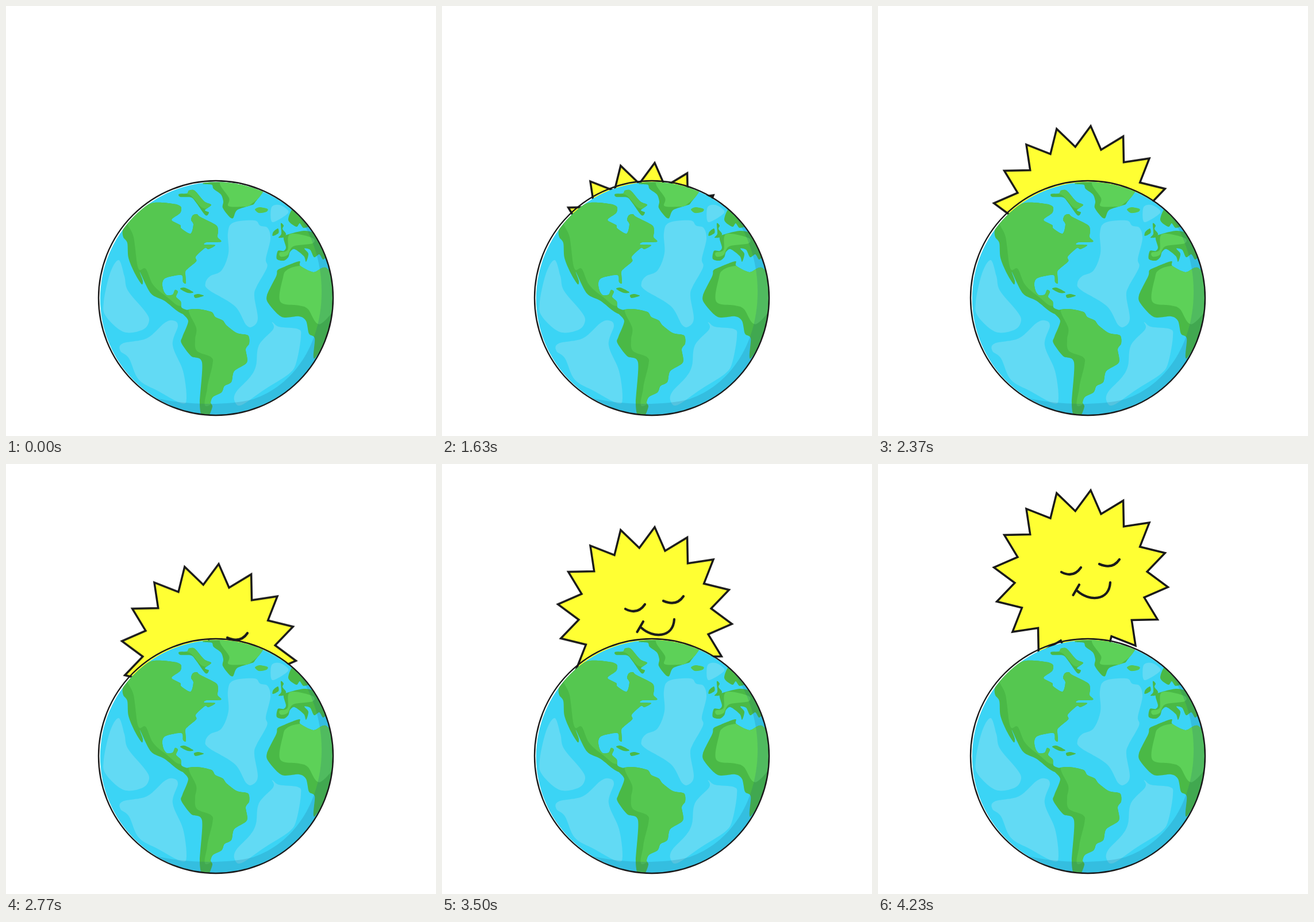
An HTML page that plays this animation: 748x748 px, repeating every 5630 ms.

```html
<!DOCTYPE html>
<html lang="en">
<head>
<meta charset="utf-8">
<title>Sunrise over the Earth</title>
<style>
  html, body { margin: 0; width: 100%; height: 100%; overflow: hidden; background: #fff; }
  svg { display: block; width: 100%; height: 100%; }
  .sun { animation: rise 5630ms infinite; }
  .body { fill: #ffff33; stroke: #1a1a1a; stroke-width: 3.5; stroke-miterlimit: 8; }
  .face { fill: none; stroke: #1a1a1a; stroke-width: 4.2; stroke-linecap: round; }
  @keyframes rise {
    0%, 21.24% { transform: translateY(300px); }
    21.243% { transform: translateY(265px); animation-timing-function: steps(91, end); }
    75.062%, 100% { transform: translateY(0); }
  }
</style>
</head>
<body>
<svg viewBox="0 0 748 748">
  <defs>
    <clipPath id="globe"><circle cx="366.5" cy="509" r="202.7"/></clipPath>
  </defs>
  <g class="sun">
    <path class="body" id="star"/>
    <path class="face" d="M319 188Q340 199 353 180M385 174Q408 184 420 166"/>
    <path class="face" d="M347 221C367 239 402 239 404 206M339.5 228L350 210"/>
  </g>
  <g clip-path="url(#globe)">
    <circle cx="366.5" cy="509" r="204" fill="#3bd4f5"/>
    <g id="map"></g>
    <path fill="#1a5a80" fill-opacity=".18"
      d="M258 681C300 693 380 697 430 684C500 660 548 590 549 500C550 450 535 390 488 338H600V740H240Z"/>
  </g>
  <circle cx="365" cy="508" r="204" fill="none" stroke="#1a1a1a" stroke-width="2.4"/>
</svg>
<script>
const NS = 'http://www.w3.org/2000/svg';
const map = document.getElementById('map');
const WATER = '#62daf4', DARK = '#4ab946', MID = '#55c750', LIGHT = '#5dd158';

// Sixteen rays, tips and notches alternating around the centre.
function star(cx, cy, tip, notch, rays, start) {
  let d = '';
  for (let i = 0; i < rays * 2; i++) {
    const angle = start + i * Math.PI / rays, r = i % 2 ? notch : tip;
    d += `${i ? 'L' : 'M'}${cx + r * Math.cos(angle)} ${cy + r * Math.sin(angle)}`;
  }
  return d + 'Z';
}
document.getElementById('star').setAttribute('d', star(353, 197, 152.3, 115.5, 16, -1.459));

// Closed Catmull-Rom curve; tension below 1 keeps coastlines crisp.
function smooth(text, tension = 1) {
  const pts = text.trim().split(/\s+/).map(p => p.split(',').map(Number));
  const at = i => pts[(i + pts.length) % pts.length];
  const handle = (i, dir) => at(i).map((v, k) =>
    (v + dir * tension * (at(i + 1)[k] - at(i - 1)[k]) / 6).toFixed(1));
  return 'M' + pts[0] + pts.map((_, i) =>
    `C${handle(i, 1)} ${handle(i + 1, -1)} ${at(i + 1)}`).join('') + 'Z';
}

function add(parent, tag, attrs) {
  const el = document.createElementNS(NS, tag);
  for (const name in attrs) el.setAttribute(name, attrs[name]);
  return parent.appendChild(el);
}

function sea(points) {
  add(map, 'path', { d: smooth(points), fill: WATER });
}

let count = 0;
function land(coast, color, inner, innerColor) {
  const d = smooth(coast, 0.85);
  add(map, 'path', { d, fill: color });
  if (!inner) return;
  const id = 'land' + count++;
  add(add(map, 'clipPath', { id }), 'path', { d });
  add(map, 'path', { d: smooth(inner), fill: innerColor, 'clip-path': `url(#${id})` });
}

// Pale currents
sea('196,442 206,470 212,495 241,530 249,547 238,563 205,567 174,540 170,515 181,465');
sea(`290,547 299,556 290,590 308,635 314,682 305,691 265,670 231,650 214,613 199,600 203,587
  245,578 275,552`);
sea(`395,377 432,373 442,382 455,386 460,405 452,440 454,455 436,488 432,505 438,543 430,557
  418,555 398,522 353,494 347,482 355,470 375,460 387,430 386,395`);
sea(`463,550 475,558 508,562 513,575 505,620 492,640 450,667 410,694 398,688 400,672 425,645
  435,625 440,590 465,562`);
sea('462,350 475,346 488,353 490,361 468,375 461,372');

// Greenland, Arctic islands, Iceland
land(`343,308 395,290 450,310 433,342 425,347 402,355 395,369 388,366 377,351 378,340 374,328
  361,318 358,311`, DARK, '372,306 388,334 387,348 412,349 425,346 448,318 400,290', LIGHT);
land(`301,327 315,326 318,321 328,321 345,340 357,346 346,355 353,359 347,364 330,341 322,333
  303,332`, DARK, '309,325 322,330 340,350 352,352 362,346 328,316', MID);
land('433,354 441,350 455,353 453,358 440,360', MID);

// North and Central America
land(`253,343 290,344 304,349 303,360 288,372 303,381 305,387 321,396 326,380 322,372 325,364
  332,362 338,367 365,381 369,391 368,402 374,410 349,411 345,415 364,416 352,423 346,421
  330,436 331,444 316,457 312,463 313,482 308,480 305,468 278,473 272,482 274,495 280,503
  290,502 294,494 299,497 296,506 304,514 306,525 322,532 316,538 300,532 276,513 252,500
  233,463 238,478 236,484 224,465 213,438 211,412 204,402 204,388 222,364`, DARK,
  '212,372 222,402 230,456 243,457 256,485 280,506 305,521 320,480 390,410 330,330 240,335', MID);
land('303,492 311,490 326,498 316,499', DARK);
land('327,503 334,501 344,504 330,508', DARK);

// South America
land(`306,532 330,527 357,532 364,541 377,547 384,556 402,569 421,573 423,587 417,597 419,620
  397,635 392,654 380,661 375,672 360,680 356,690 359,697 352,714 341,714 337,690 341,620
  322,609 305,586 307,575 317,548`, DARK,
  '318,526 331,560 329,580 332,600 357,611 359,625 350,665 353,695 435,620 435,570 350,515', MID);

// Europe
land('478,378 483,382 481,388 487,396 484,402 474,403 479,396', DARK);
land('465,393 473,387 474,395 464,400', DARK);
land('491,372 503,350 532,378 518,386 511,378 505,384', DARK);
land(`486,399 520,391 545,400 560,428 552,441 545,432 536,437 529,424 519,422 526,431 522,445
  518,435 502,423 494,428 491,437 483,443 471,440 473,426 483,426 487,420 483,405`, DARK,
  '494,397 532,403 533,413 500,418 490,433 478,436 476,429 490,424', LIGHT);

// Africa
land(`481,455 510,444 512,452 535,463 559,457 590,515 538,612 537,578 527,570 522,548 510,540
  480,541 457,518 454,503 470,470 472,460`, DARK,
  '482,472 489,459 511,452 560,450 585,500 547,553 525,527 510,521 477,514', LIGHT);
</script>
</body>
</html>
```
